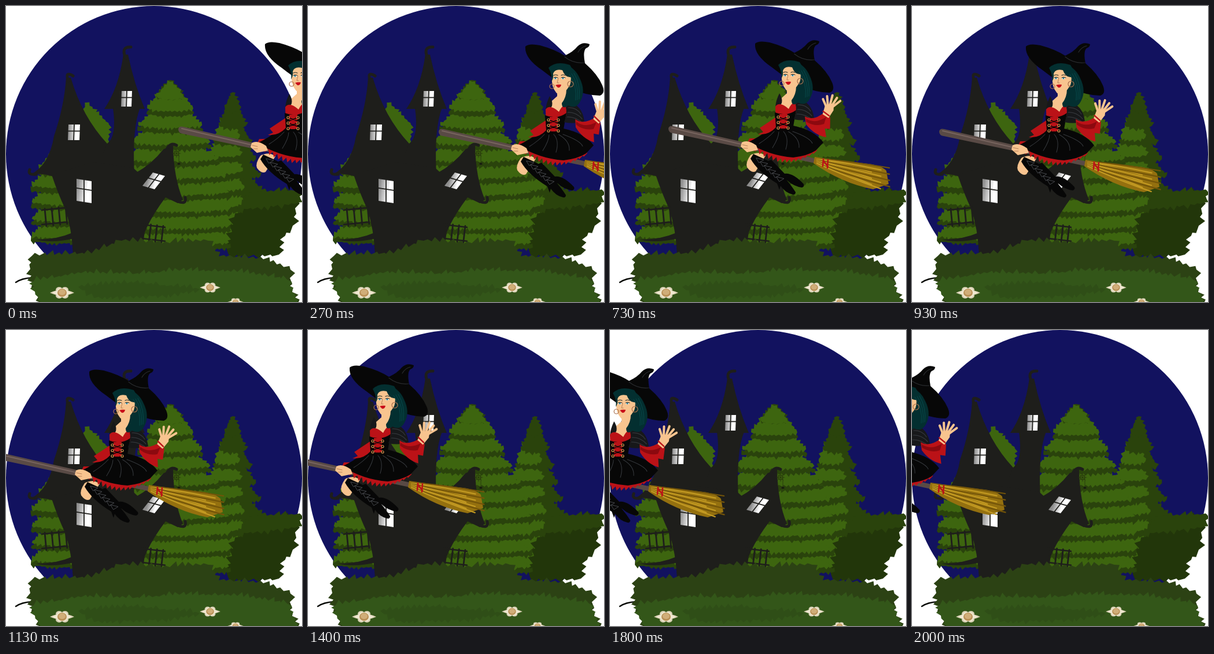
An HTML page with a canvas for the animation above (2.07 s loop, 512x512 px).

```html
<!DOCTYPE html>
<html lang="en">
<head>
<meta charset="utf-8">
<title>Witch over the haunted house</title>
<style>
html, body { margin: 0; width: 100%; height: 100%; overflow: hidden; background: #fff; }
canvas { display: block; width: 512px; height: 512px; }
</style>
</head>
<body>
<canvas id="stage" width="512" height="512"></canvas>
<script>
const stage = document.getElementById('stage').getContext('2d');
const backdrop = document.createElement('canvas');
backdrop.width = backdrop.height = 512;
let g = backdrop.getContext('2d');

const LIGHT = '#3d650f', DARK = '#2a430c', DEEP = '#22360a', HOUSE = '#1e1e1b';
const SKIN = '#f8c48f', CREASE = '#a76f4d', RED = '#bb1217', BLACK = '#070707';
const CLOTH = '#17181a', SEAM = '#34373b', HAIR = '#032f30', GOLD = '#d99a51';

function fill(d, color) {
  g.fillStyle = color;
  g.fill(new Path2D(d));
}
function line(d, color, width) {
  g.strokeStyle = color;
  g.lineWidth = width;
  g.lineCap = g.lineJoin = 'round';
  g.stroke(new Path2D(d));
}
function oval(x, y, rx, ry, color, turn = 0) {
  g.fillStyle = color;
  g.beginPath();
  g.ellipse(x, y, rx, ry, turn, 0, 7);
  g.fill();
}
function ring(x, y, r, color) {
  g.strokeStyle = color;
  g.lineWidth = 1.2;
  g.beginPath();
  g.arc(x, y, r, 0, 7);
  g.stroke();
}
function repeat(n, draw) {
  for (let i = 0; i < n; i++) draw(i);
}
function random(seed) {
  return () => (seed = (seed * 16807) % 2147483647) / 2147483647;
}

// Clockwise outline [x, y, x, y, ...] with pointed leaves along every edge.
function leaves(pts, color, size, seed) {
  const rnd = random(seed * 7919);
  g.fillStyle = color;
  g.beginPath();
  for (let i = 0; i < pts.length; i += 2) {
    const x = pts[i], y = pts[i + 1];
    const dx = pts[(i + 2) % pts.length] - x, dy = pts[(i + 3) % pts.length] - y;
    const len = Math.hypot(dx, dy), n = Math.max(1, Math.round(len / (size * 1.6)));
    repeat(n, k => {
      const f = (k + 0.3 + 0.6 * rnd()) / n, s = size * (0.2 + rnd());
      g.lineTo(x + dx * k / n, y + dy * k / n);
      g.lineTo(x + dx * f + dy / len * s, y + dy * f - dx / len * s);
    });
  }
  g.closePath();
  g.fill();
}

function tier(x, y, w, h, color, seed) {
  const side = s => [x + s * w * 0.5, y - h * 0.6];
  leaves([x, y - h, ...side(1), x + w, y, x + w * 0.4, y + 4, x - w * 0.4, y + 4, x - w, y, ...side(-1)], color, 5, seed);
}

// Tiers are stacked upwards; `lean` moves the lit part to the left.
function fir(x, top, bottom, spread, widest, lean) {
  const gap = 29;
  for (let i = Math.floor((bottom - top) / gap); i > 0; i--) {
    const y = top + i * gap, w = Math.min(widest, spread * (y - top) ** 0.8);
    const h = i > 1 ? gap * 1.6 : gap;
    tier(x, y, w, h, DARK, i + x);
    if (lean && i < 3) continue;
    tier(x - w * lean, y - (i > 1 ? 9 : 0), w * (0.97 - lean), h * 0.9, LIGHT, i + x + 40);
  }
}

function trees() {
  fir(97, 232, 425, 1.6, 54, 0);
  leaves([139, 167, 178, 205, 176, 239, 132, 190], LIGHT, 5, 4);
  fir(392, 149, 430, 0.9, 75, 0.3);
  leaves([437, 337, 505, 322, 500, 350, 496, 380, 474, 404, 472, 430, 385, 430, 395, 365], DEEP, 9, 29);
  leaves([428, 322, 510, 319, 505, 340, 400, 352], DARK, 7, 31);
  fir(284, 128, 440, 1.6, 105, 0);
}

function pane(x, y, ux, uy, vx, vy) {
  const at = (a, b) => `${x + a * ux + b * vx} ${y + a * uy + b * vy}`;
  const shade = g.createLinearGradient(x + vx / 2, y + vy / 2, x + ux + vx / 2, y + uy + vy / 2);
  shade.addColorStop(0, '#8d8d8d');
  shade.addColorStop(0.7, '#fff');
  fill(`M${at(0, 0)}L${at(1, 0)}L${at(1, 1)}L${at(0, 1)}Z`, shade);
  line(`M${at(0.5, 0)}L${at(0.5, 1)}M${at(0, 0.42)}L${at(1, 0.42)}`, HOUSE, 1.8);
}

function fence(x, y, w, slope, h) {
  for (const v of [0, h]) line(`M${x} ${y + v}l${w} ${w * slope}`, HOUSE, 2.6);
  repeat(4, i => {
    const u = 5 + i * (w - 8) / 3;
    line(`M${x + u} ${y - 2 + u * slope}l${slope * -28} ${h + 5}`, HOUSE, 2.8);
  });
}

function house() {
  fill('M104 124L112 124Q132 192 175 238L200 300L130 330L79 294Q60 288 42 292Q75 275 83 225Q101 172 104 124Z', HOUSE);
  fill('M203 84L211 84Q222 136 240 178H170Q195 142 203 84Z', HOUSE);
  fill('M185 176H232Q218 210 222 292L150 300L175 238Q192 226 185 176Z', HOUSE);
  fill('M272 248Q252 274 222 290L200 330L276 331L297 341L306 335Q290 297 289 241Z', HOUSE);
  fill('M79 292Q90 325 102 350Q114 385 116 430H229Q235 385 276 331L220 280L150 270Z', HOUSE);
  fill('M51 404Q85 405 118 391V402Q80 411 51 404Z', HOUSE);
  line('M108 130Q101 112 116 121M207 90Q198 70 216 71M278 248Q284 235 295 241M297 338Q313 344 310 331M52 291Q37 293 41 283', HOUSE, 5);
  pane(108, 205, 20, 0, -1, 27);
  pane(200, 147, 18, 0, -1, 27);
  pane(122, 299, 26, 4, 0, 38);
  pane(254, 288, 21, 6, -18, 23);
  fence(62, 353, 44, -0.1, 25);
  fence(235, 378, 40, 0.12, 24);
  const web = '#26330d';
  repeat(4, i => {
    const a = i * Math.PI / 4, x = 7 * Math.cos(a), y = 7 * Math.sin(a);
    line(`M${295 - x} ${255 - y}L${295 + x} ${255 + y}`, web, 0.7);
  });
  ring(295, 255, 4, web);
  line('M299 258V271M295 275L303 271M295 271L303 275', web, 0.8);
  oval(299, 273, 2.4, 1.8, '#171b10');
}

function flower(x, y, s) {
  g.save();
  g.translate(x, y);
  g.scale(s, s);
  for (const [size, color] of [[1, '#d8d0b4'], [0.8, '#efe8d0']]) {
    fill(`M${-21 * size} 0Q0 -10 ${21 * size} 0Q0 10 ${-21 * size} 0Z`, color);
    repeat(4, i => oval((i % 2 * 10 - 5) * size, (i > 1 ? 5 : -5) * size, 6 * size, 5 * size, color));
  }
  oval(0, 0, 8, 7, '#b98f56');
  oval(0, -1, 6, 5, '#d0ad78');
  g.restore();
}

function grass() {
  line('M17 478Q27 471 45 470', '#080a06', 2.5);
  leaves([45, 432, 148, 428, 200, 406, 270, 411, 350, 406, 368, 433, 445, 438, 492, 456, 490, 485, 505, 514, 62, 514, 46, 478, 42, 455], '#2c4214', 8, 67);
  leaves([48, 476, 130, 462, 230, 464, 300, 458, 400, 460, 486, 473, 494, 494, 505, 514, 62, 514, 50, 494], '#335619', 7, 71);
  leaves([125, 486, 220, 479, 335, 490, 270, 500, 160, 503], '#2f4e17', 7, 73);
  flower(97, 496, 1);
  flower(353, 487, 0.85);
  flower(397, 512, 0.65);
}

function broom() {
  fill('M101 212Q102 206 110 208L356 264L355 272L109 220Q101 219 101 212Z', '#594a45');
  line('M107 211L235 241', '#77645e', 2);
  fill('M354 261Q400 268 447 273Q470 276 478 285L482 308L455 317Q400 306 352 272Z', '#94700f');
  repeat(11, i => {
    const reach = 468 + 18 * Math.sin(i * 2.1 + 1), y = 280 + i * 3.6;
    line(`M358 ${264 + i * 0.8}Q${400 + i} ${266 + i * 3} ${reach} ${y}`, i % 3 ? '#c39a22' : '#735409', 2.2);
  });
  line('M369 265L368 277M377 266L376 280M369 267L377 278', RED, 2.6);
}

function legs() {
  fill('M243 258Q258 250 269 259L252 286Q245 290 237 279Q234 271 243 258Z', SKIN);
  fill('M279 266L302 290Q316 288 335 308Q337 312 332 314Q318 312 307 302L293 297L263 272Z', BLACK);
  fill('M248 256L272 267Q306 298 321 322Q321 327 316 326Q303 323 295 311L293 318L289 307Q256 287 243 264Z', BLACK);
  repeat(6, i => {
    const x = 253 + i * 7, y = 263 + i * 6.5;
    line(`M${x} ${y}l13 3l-8 5z`, '#4c4f53', 0.9);
  });
}

function skirt() {
  let hem = 'M241 229';
  repeat(16, i => {
    const u = i / 15, x = 238 + u * 117, y = 238 + 29 * Math.sin(u * 2.65);
    hem += `L${x - 3} ${y + 4}L${x + 3} ${y - 2}`;
  });
  fill(hem + 'L349 228Z', RED);
  fill('M289 208Q304 213 317 207Q354 215 369 236L356 250Q342 259 317 262Q275 259 238 236Q261 225 270 216Z', BLACK);
  repeat(5, i => line(`M${284 + i * 8} 217Q${274 + i * 18} 228 ${258 + i * 23} ${238 + 10 * Math.sin(i * 0.8)}`, SEAM, 1.1));
}

function body() {
  fill('M289 166L306 151V136L322 140Q323 156 334 165L322 183Q304 191 287 176Z', SKIN);
  fill('M293 151Q299 160 297 168L288 182Q283 172 293 151Z', CLOTH);
  fill('M286 174Q293 164 309 178Q316 163 328 164Q328 181 318 191L316 211L287 213Z', RED);
  fill('M285 184Q306 192 322 180L316 214Q300 219 286 213Z', BLACK);
  fill('M293 187H307V212H293Z', RED);
  repeat(3, i => {
    const y = 192 + i * 9.5;
    line(`M291 ${y}l17 6M308 ${y}l-17 6`, BLACK, 1.6);
    for (const x of [291, 308]) ring(x, y, 2, GOLD);
  });
  fill('M286 193L259 211L265 218L256 222Q274 224 287 210Z', RED);
  fill('M327 162Q349 166 353 194Q337 200 318 196Q324 180 321 170Z', CLOTH);
  repeat(3, i => line(`M${325 - i} ${171 + i * 8}q14 -1 ${22 + i * 3} 11`, SEAM, 1.2));
  fill('M228 236Q238 230 253 241L256 249L237 253L226 243Z', SKIN);
  line('M229 240l9 2M231 246h7', CREASE, 0.8);
}

function wavingArm(turn) {
  g.save();
  g.translate(340, 194);
  g.rotate(turn);
  g.translate(-340, -194);
  fill('M337 191Q352 200 371 185L381 194L380 214L371 213L373 228Q353 224 339 205Z', RED);
  fill('M339 195Q355 205 374 193L370 205Q354 210 339 200Z', '#8c090f');
  fill('M368 188L373 172L388 170L387 182L378 195Z', SKIN);
  repeat(5, i => {
    const a = -1.95 + i * 0.33, reach = i ? 21 - Math.abs(i - 2) * 2 : 15;
    line(`M${375 + i * 2.6} 176l${reach * Math.cos(a)} ${reach * Math.sin(a)}`, SKIN, 4);
  });
  line('M369 183l10 8', RED, 2.4);
  g.restore();
}

function hat() {
  fill('M251 65Q257 59 276 63Q302 70 319 81Q334 74 341 65Q350 56 362 61Q362 66 356 68Q350 73 354 94Q376 113 384 132Q390 146 380 150Q335 150 280 106Q249 85 251 65Z', BLACK);
  line('M319 83Q334 95 353 93M342 75Q347 66 356 64', '#292b2e', 1.2);
}

function head() {
  fill('M320 96Q338 103 345 120Q356 142 346 160Q339 174 325 167Q314 175 314 163Q322 153 322 139Z', HAIR);
  fill('M301 101Q296 113 297 126Q298 141 309 149Q319 147 328 132Q333 118 324 99Z', SKIN);
  fill('M291 102Q304 89 328 97L343 122Q334 124 329 118Q320 119 315 106Q302 103 299 112Q300 120 296 126Q298 114 291 102Z', HAIR);
  repeat(3, i => line(`M${327 + i * 4} ${113 - i}q${14 - i} 20 ${11 - i} 45`, '#08494a', 1));
  for (const x of [303, 316]) {
    line(`M${x - 3} 115q3 -2 7 0`, '#27302a', 1.1);
    oval(x, 120, 3, 1.7, '#f6f5ed');
    oval(x, 120, 1.5, 1.6, '#237b93');
    line(`M${x - 3} 119q3 -2 7 0`, '#151715', 1);
  }
  line('M308 120l-2 8h3', CREASE, 0.8);
  fill('M303 132Q308 130 313 131Q312 137 307 136Z', '#c90e19');
  ring(329, 130, 5, CREASE);
  ring(297, 134, 4, CREASE);
}

function witch(step) {
  // The last three moments of the flight slow down.
  const p = step <= 27 ? step : 27 + (step - 27) * 2 / 3;
  const lift = 4 - 4 * Math.cos((p - 11) * Math.PI / 5);
  const wave = Math.max(0, Math.cos((p - 11) * Math.PI / 10)) ** 2;
  g.save();
  g.translate(Math.round((11 - p) * 17.88), Math.round(lift));
  broom();
  legs();
  skirt();
  hat();
  body();
  wavingArm(0.09 - 0.12 * wave);
  head();
  g.restore();
}

oval(256, 256, 256, 256, '#12125f');
trees();
house();
grass();
g = stage;

const LOOP = 2070, STEPS = 31;
const startOf = k => Math.round(k * 20 / 3) * 10;
const start = performance.now();

function draw(now) {
  const t = Math.max(0, now - start) % LOOP;
  let step = STEPS - 1;
  while (step > 0 && startOf(step) > t) step--;
  g.clearRect(0, 0, 512, 512);
  g.drawImage(backdrop, 0, 0);
  witch(step);
  requestAnimationFrame(draw);
}
draw(start);
</script>
</body>
</html>
```
